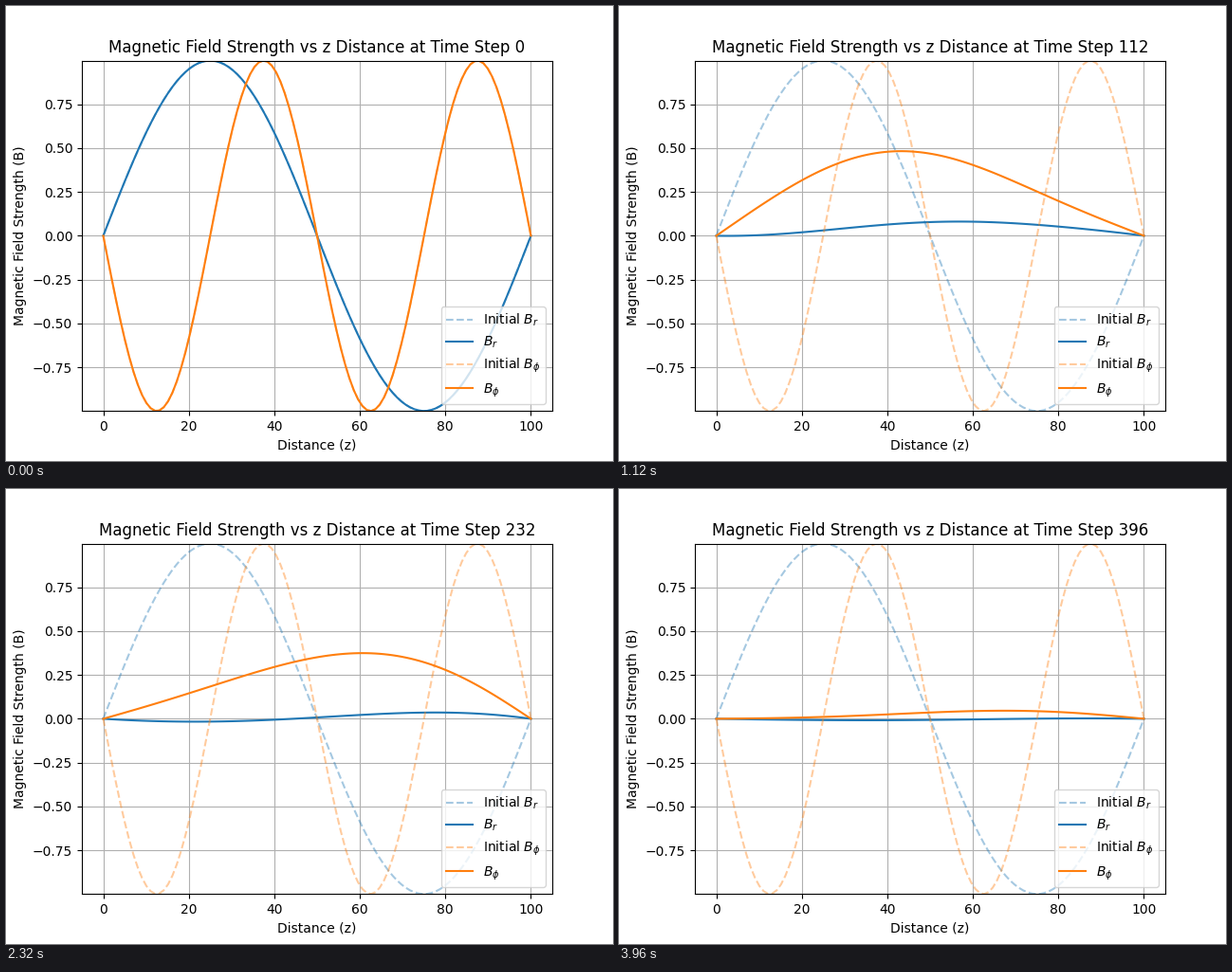
A matplotlib script that plays this animation: 640x480 px, repeating every 4 s.

```python
import numpy as np
import matplotlib.pyplot as plt
from matplotlib.animation import FuncAnimation

# Alpha-omega dynamo on a slab, both field components zero at the ends
N, LENGTH = 100, 100.0
ETA, ALPHA, SHEAR = 10.466, 0.1019, 0.102   # per time step
FRAMES, STRIDE = 100, 4

z = np.linspace(0, LENGTH, N)
dz = z[1] - z[0]
br0 = np.sin(2 * np.pi * z / LENGTH)
bphi0 = -np.sin(4 * np.pi * z / LENGTH)


def stride_matrix():
    """Crank-Nicolson propagator over one frame for the inner points."""
    n = N - 2
    eye = np.eye(n)
    up, down = np.eye(n, k=1), np.eye(n, k=-1)
    diffuse = ETA * (up - 2 * eye + down) / dz**2
    slope = (up - down) / (2 * dz)
    rate = np.block([[diffuse, -ALPHA * slope], [SHEAR * eye, diffuse]])
    one = np.eye(2 * n)
    step = np.linalg.solve(one - rate / 2, one + rate / 2)
    return np.linalg.matrix_power(step, STRIDE)


def solve():
    advance = stride_matrix()
    state = np.concatenate([br0[1:-1], bphi0[1:-1]])
    fields = []
    for _ in range(FRAMES):
        fields.append([np.pad(half, 1) for half in np.split(state, 2)])
        state = advance @ state
    return fields


fields = solve()

fig, ax = plt.subplots(figsize=(6.4, 4.8), dpi=100)
ax.plot(z, br0, "--", color="C0", alpha=0.4, label="Initial $B_r$")
br_line, = ax.plot(z, br0, color="C0", label="$B_r$")
ax.plot(z, bphi0, "--", color="C1", alpha=0.4, label=r"Initial $B_\phi$")
bphi_line, = ax.plot(z, bphi0, color="C1", label=r"$B_\phi$")
ax.set_xlabel("Distance (z)")
ax.set_ylabel("Magnetic Field Strength (B)")
ax.set_ylim(br0.min(), br0.max())
ax.grid(True)
ax.legend(loc="lower right")
title = ax.set_title("")


def update(i):
    br, bphi = fields[i]
    br_line.set_ydata(br)
    bphi_line.set_ydata(bphi)
    title.set_text("Magnetic Field Strength vs z Distance at Time Step "
                   f"{i * STRIDE}")
    return br_line, bphi_line, title


anim = FuncAnimation(fig, update, frames=FRAMES, interval=40, repeat=True)
plt.show()
```
